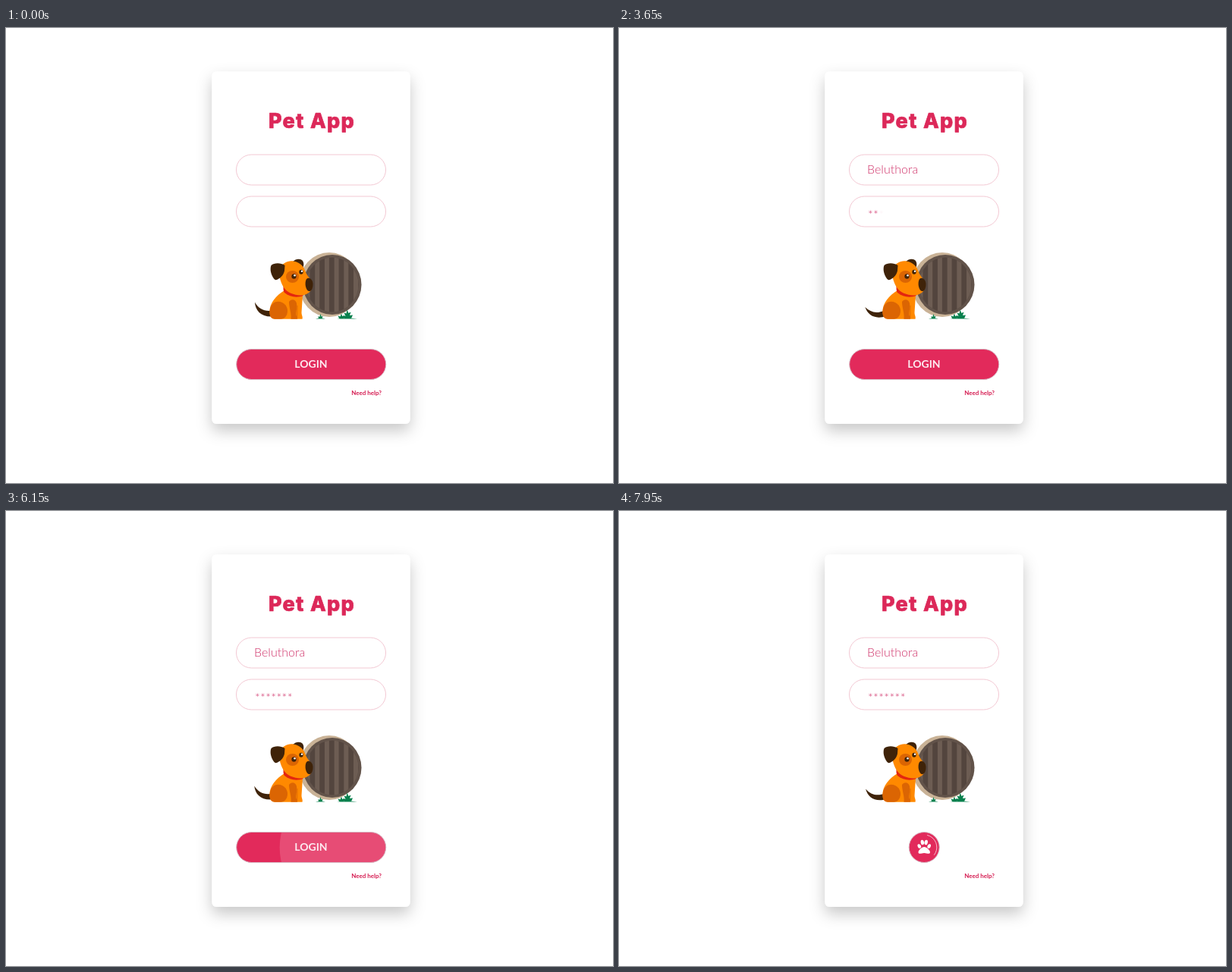
An HTML page that plays this animation: 800x600 px, repeating every 8000 ms.

```html
<!DOCTYPE html>
<html lang="en">
<head>
<meta charset="utf-8">
<title>Pet App login</title>
<style>
  html, body { margin: 0; width: 100%; height: 100%; overflow: hidden; background: #fff; }
  svg { display: block; width: 800px; height: 600px; }
  text { font-family: Lato, sans-serif; }
  .title { font: 800 27px Inter, sans-serif; letter-spacing: 1.3px; fill: #dc2859; stroke: #dc2859; stroke-width: .7; stroke-linejoin: round; }
  .field { fill: #fff; stroke: #f3c8d3; stroke-width: 1; }
  .value { font-size: 16px; font-weight: 300; fill: #d0346b; }
  .dark { fill: #3f2309; }
  .orange { fill: #ff8900; }
  .rust { fill: #db6503; }
  .green { fill: #08804d; }
</style>
</head>
<body>
<svg viewBox="0 0 800 600">
  <defs>
    <filter id="shadow" x="-20%" y="-20%" width="140%" height="140%">
      <feDropShadow dx="0" dy="9" stdDeviation="10" flood-color="#000" flood-opacity=".22"/>
    </filter>
    <clipPath id="grille"><ellipse cx="430" cy="338.5" rx="34.5" ry="36"/></clipPath>
    <clipPath id="pill"><rect id="pillShape" y="423.5" height="40" rx="20"/></clipPath>
  </defs>

  <rect x="271.5" y="57.5" width="261" height="464.5" rx="6" fill="#fff" filter="url(#shadow)"/>
  <text class="title" x="403" y="132" text-anchor="middle">Pet App</text>

  <rect class="field" x="303.5" y="167" width="197" height="40" rx="20"/>
  <rect class="field" x="303.5" y="222" width="197" height="40" rx="20"/>
  <text id="user" class="value" x="327" y="192"></text>
  <text id="pass" class="value" x="328" y="251.5" letter-spacing=".3"></text>

  <!-- barrel -->
  <ellipse cx="426" cy="338.5" rx="40" ry="42.5" fill="#c9b296"/>
  <ellipse cx="430" cy="338.5" rx="38.5" ry="39.5" fill="#62534a"/>
  <g id="bars" clip-path="url(#grille)">
    <rect x="390" y="298" width="80" height="82" fill="#53453e"/>
  </g>

  <!-- grass -->
  <g class="green">
    <path d="M408 383.5Q414 381.5 421 383.5ZM436 383.6Q450 381.5 463 383.6Z"/>
    <path d="M412 383L411.5 380L413.3 381L414.5 377L415.6 380.5L417.5 380L416.5 383Z"/>
    <path d="M439 383L437.5 379.5L440.5 380.5L442 376.5L443.2 380L446.5 379L445 383Z"/>
    <path d="M445.5 383L444.5 379.5L447.5 380L445.5 375.5L448.5 376.5L449.5 371.5L451.5 376L454.5 374.5L453 379L457 378.5L455 383Z"/>
  </g>

  <!-- dog -->
  <path id="tail" class="dark" d="M352 372.5C341 374.5 333 370.5 328 361.5C328.500 372.500 336 381.500 352 380.500Z"/>
  <path class="orange" d="M367 346C357 352 347 362 347.500 375C347.600 381 350 383.700 355 383.700H390.500C391.500 381 389.500 379 389.500 375L391 352Z"/>
  <path class="rust" d="M348 370C350 362 357 359 364 362C371 365 373 374 369 380C367 383 365 383.700 361 383.700H354C348 383.500 346.500 377 348 370Z"/>
  <path class="rust" d="M373 361C376 356.500 382 358 383 363C384 369 382 374 382.500 379C384 381 384 382 383.500 383.700H375.500C376.500 376 373 369 373 361Z"/>
  <path d="M384 366L383.600 383.700" stroke="#db6503" stroke-width=".8"/>
  <path d="M366 338C365 343 365.500 347 367 349C374 355 384 356 391.500 353L392 347Z" fill="#e3260f"/>
  <ellipse id="tongue" cx="394.500" rx="3" ry="3.200" fill="#ff3f68"/>
  <path class="dark" d="M378 308C382 304 388 303.500 391 307C393 310 392.500 314 391 316.500Z"/>
  <path class="orange" d="M361 317C364 310 372 306 379 307.500C388 309 393 315 395 322C397 327 401 330 403.500 336C405 342 402 349 394 351.800C384 354 371 350 366 342C361 334 359 324 361 317Z"/>
  <ellipse class="rust" cx="377.500" cy="328" rx="8.500" ry="8"/>
  <ellipse class="dark" cx="379.500" cy="327.500" rx="3.100" ry="3.300"/>
  <circle cx="380.500" cy="326.300" r="1.300" fill="#fff"/>
  <ellipse class="dark" cx="389" cy="321.800" rx="2.700" ry="3"/>
  <circle cx="390" cy="320.800" r="1.200" fill="#fff"/>
  <path class="dark" d="M396 331C400 327.500 404.500 332 404.500 338C404.500 344 402 347.500 399 347C395 346 393 336 396 331Z"/>
  <path class="dark" d="M367.500 313C362 309 353 309.500 349.500 313C347 318 350 329 355 332.300C360 332 366 326 367 320Z"/>

  <!-- login button -->
  <g clip-path="url(#pill)">
    <rect x="303" y="423" width="198" height="41" fill="#e22a5b"/>
    <circle id="ripple" cx="445" cy="443.500" fill="#fff"/>
  </g>
  <rect id="rim" y="423.500" height="40" rx="20" fill="none" stroke="#d6b6c1"/>
  <text id="label" x="402" y="448" text-anchor="middle" font-size="14" font-weight="700" fill="#fdeaf0">LOGIN</text>
  <g id="paw" fill="#fff">
    <path d="M402.200 443C405.500 443 410 447.500 410 450C410 452.500 407 452 402.200 451C397.500 452 394.500 452.500 394.500 450C394.500 447.500 399 443 402.200 443Z"/>
    <ellipse cx="395.800" cy="442" rx="2.100" ry="2.900" transform="rotate(-25 395.800 442)"/>
    <ellipse cx="399.900" cy="437" rx="2.200" ry="3.200" transform="rotate(-10 399.900 437)"/>
    <ellipse cx="404.700" cy="437" rx="2.200" ry="3.200" transform="rotate(10 404.700 437)"/>
    <ellipse cx="408.700" cy="442" rx="2.100" ry="2.900" transform="rotate(25 408.700 442)"/>
    <circle id="spinner" cx="402.300" cy="443.500" r="16.500" fill="none" stroke="#f7bdcd" stroke-width=".9" pathLength="360" stroke-dasharray="115 245"/>
  </g>
  <text x="495" y="483.500" text-anchor="end" font-size="8" font-weight="700" fill="#d51d52">Need help?</text>
</svg>
<script>
const LOOP = 8000;
const NS = "http://www.w3.org/2000/svg";
const $ = id => document.getElementById(id);
const clamp = x => Math.min(1, Math.max(0, x));
const span = (t, a, b) => clamp((t - a) / (b - a));
const smooth = x => x * x * (3 - 2 * x);

function add(parent, name, attrs) {
  const el = document.createElementNS(NS, name);
  set(el, attrs);
  parent.append(el);
  return el;
}

function set(el, attrs) {
  for (const key in attrs) el.setAttribute(key, attrs[key]);
}

function letters(id, word) {
  return [...word].map(ch => {
    const el = add($(id), "tspan", {});
    el.textContent = ch;
    return el;
  });
}

// Each letter fades in as the typing position passes over it.
function type(chars, progress) {
  chars.forEach((el, i) => set(el, { "fill-opacity": clamp(progress * chars.length - i) }));
}

const user = letters("user", "Beluthora");
const pass = letters("pass", "*******");

for (let i = 0; i < 6; i++) {
  add($("bars"), "rect", { x: 394.5 + 12.7 * i, y: 298, width: 6, height: 82, fill: "#6d5d53" });
}

function draw(t) {
  type(user, span(t, 0, 2000));
  type(pass, span(t, 3000, 5200));

  const wag = Math.cos(2 * Math.PI * (t / 1500 + 0.03));
  set($("tail"), { transform: `rotate(${8 * (wag - 1)} 350 378)` });

  const pant = (t / 700) % 1;
  const out = Math.sin(Math.PI * span(pant, 0.38, 0.72));
  set($("tongue"), { cy: 346.5 + 3.5 * out });

  const grow = Math.max(0, (t - 5700) * 0.187);
  set($("ripple"), { r: Math.min(grow, 150), opacity: 0.16 * (1 - span(t, 6400, 6850)) });

  const morph = span(t, 6900, 7900);
  const half = 98.5 - 78.5 * smooth(morph);
  for (const id of ["pillShape", "rim"]) {
    set($(id), { x: 402.2 - half, width: 2 * half });
  }
  set($("label"), { opacity: 1 - span(t, 7100, 7750) });
  set($("paw"), { opacity: span(t, 7100, 7750) });
  const angle = -52 + (t - 7350) * 0.558;
  set($("spinner"), { transform: `rotate(${angle} 402.3 443.5)` });
}

const start = performance.now();
function frame() {
  draw((performance.now() - start) % LOOP);
  requestAnimationFrame(frame);
}
draw(0);
requestAnimationFrame(frame);
</script>
</body>
</html>
```
